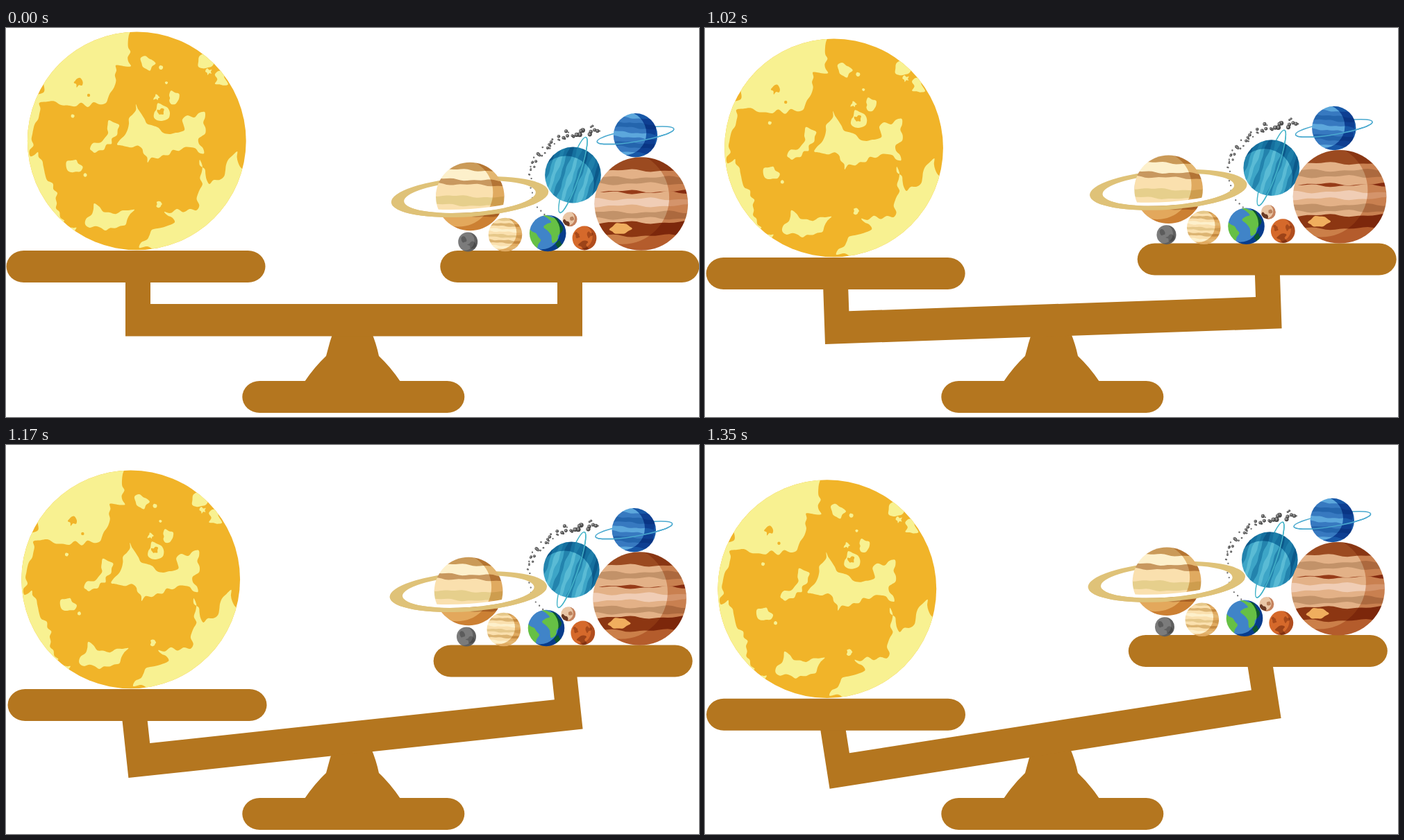
An HTML page for the animation above (2.7 s loop, 998 by 561 pixels).

```html
<!DOCTYPE html>
<html lang="en">
<head>
<meta charset="utf-8">
<title>Sun and planets on a balance</title>
<style>
  html, body { margin: 0; width: 100%; height: 100%; overflow: hidden; background: #fff; }
  svg { display: block; width: 100vw; height: 100vh; }
  .shade { mix-blend-mode: multiply; }
</style>
</head>
<body>
<svg id="stage" viewBox="0 0 998 561"></svg>
<script>
const WOOD = '#b4761f', PALE = '#f8f191', ORANGE = '#f1b429';
let clipCount = 0, seed = 20264;
const random = () => (seed = seed * 16807 % 2147483647) / 2147483647;
const jitter = amount => (random() * 2 - 1) * amount;

// Closed Catmull-Rom curve through the points.
function smooth(fill, p) {
  const at = i => p[(i + p.length) % p.length];
  let d = 'M' + p[0];
  p.forEach((a, i) => {
    const before = at(i - 1), b = at(i + 1), after = at(i + 2);
    const c1 = a.map((v, k) => v + (b[k] - before[k]) / 6);
    const c2 = b.map((v, k) => v - (after[k] - a[k]) / 6);
    d += `C${c1} ${c2} ${b}`;
  });
  return `<path fill="${fill}" d="${d}Z"/>`;
}

// Ragged patch: key corners "x y, x y", each edge broken into wobbling pieces.
function patch(fill, corners, wobble = .1) {
  const keys = corners.split(',').map(c => c.trim().split(' ').map(Number)), points = [];
  keys.forEach(([x, y], i) => {
    const [nx, ny] = keys[(i + 1) % keys.length], dx = nx - x, dy = ny - y;
    const pieces = 1 + Math.min(4, Math.floor(Math.hypot(dx, dy) / 9));
    for (let k = 0; k < pieces; k++) {
      const f = k / pieces, off = k ? jitter(wobble) : 0;
      points.push([x + dx * f - dy * off, y + dy * f + dx * off]);
    }
  });
  return smooth(fill, points);
}

function island(fill, x, y, r) {
  const wobble = r < 4 ? .1 : .45;
  return smooth(fill, Array.from({ length: 10 }, (_, i) => {
    const a = i * Math.PI / 5, d = r * (1 + jitter(wobble));
    return [x + d * Math.cos(a), y + d * Math.sin(a)];
  }));
}

const circle = (x, y, r, fill) => `<circle cx="${x}" cy="${y}" r="${r}" fill="${fill}"/>`;
const group = (transform, body) => `<g transform="${transform}">${body}</g>`;
const oval = (rx, ry) => `M${-rx} 0a${rx} ${ry} 0 1 0 ${2 * rx} 0a${rx} ${ry} 0 1 0 ${-2 * rx} 0Z`;
const pill = (x, y, w, id = '') =>
  `<rect id="${id}" x="${x}" y="${y}" width="${w}" height="46" rx="25" ry="23" fill="${WOOD}"/>`;

function clipped(shape, body) {
  const id = 'clip' + clipCount++;
  return `<clipPath id="${id}">${shape}</clipPath><g clip-path="url(#${id})">${body}</g>`;
}

// Everything below a wavy line, so later layers cover earlier ones.
function layer(r, top, fill, phase) {
  let d = `M${-r} ${r + 5}`;
  for (let x = -r; x <= r; x += r / 10) {
    const wave = Math.sin(x / r * 5 + phase) + .6 * Math.sin(x / r * 11 + phase * 2);
    d += `L${x} ${top + r * .022 * wave}`;
  }
  return `<path fill="${fill}" d="${d}V${r + 5}Z"/>`;
}

const stripes = (r, count, colors) => Array.from({ length: count },
  (_, i) => [-r + 2 * r * i / count, colors[i % colors.length]]);

// Striped planet, shaded outside a circle offset by dx, dy.
function planet({ x, y, r, fill, layers = [], tilt = 0, detail = '', shade, dx = -r * .33, dy = -r * .12 }) {
  const bands = layers.map(([top, color], i) => layer(r, top, color, i * 2.1)).join('');
  const dark = `<path class="shade" fill="${shade}" fill-rule="evenodd"
    d="M${-2 * r} ${-2 * r}h${4 * r}v${4 * r}h${-4 * r}Z
    M${dx - r} ${dy}a${r} ${r} 0 1 0 ${2 * r} 0a${r} ${r} 0 1 0 ${-2 * r} 0Z"/>`;
  return group(`translate(${x} ${y})`, clipped(circle(0, 0, r, '#000'),
    circle(0, 0, r + 1, fill) + group(`rotate(${tilt})`, bands) + detail + dark));
}

// Thin ring that passes behind the planet and returns in front of it.
function ringed(rx, ry, tilt, color, options) {
  const line = d => group(`translate(${options.x} ${options.y}) rotate(${tilt})`,
    `<path fill="none" stroke="${color}" stroke-width="1.5" d="${d}"/>`);
  return line(oval(rx, ry)) + planet(options) + line(`M${-rx} 0A${rx} ${ry} 0 0 0 ${rx} 0`);
}

// Rocks scattered along a quadratic curve, shrinking toward its end.
function rocks(count, [x0, y0], [x1, y1], [x2, y2], spread, size) {
  let out = '';
  for (let i = 0; i < count; i++) {
    const t = i / (count - 1), u = 1 - t;
    const x = u * u * x0 + 2 * u * t * x1 + t * t * x2 + jitter(spread * (.3 + u));
    const y = u * u * y0 + 2 * u * t * y1 + t * t * y2 + jitter(spread * (.3 + u));
    const r = 1 + size * (.25 + u * .75) * random();
    out += circle(x, y, r, '#484848') + circle(x - r * .2, y - r * .2, r * .6, '#929292');
  }
  return out;
}

const sunPatches = [
  `177 -5, 176 28, 180 55, 158 54, 157 82, 144 108, 100 113, 48 108, 48 124, 38 153, 35 185, 46 179,
   55 205, 74 238, 72 260, 84 278, 66 285, 20 240, 25 150, 38 112, 72 57, 95 0`,
  `187 110, 203 138, 235 153, 257 147, 254 132, 286 121, 287 152, 277 160, 285 181, 266 172, 240 176,
   204 194, 196 174, 160 168, 177 138`,
  '121 174, 147 152, 148 133, 163 140, 152 167, 128 180',
  `333 178, 345 215, 310 290, 250 325, 192 317, 210 291, 243 280, 228 265, 274 263, 283 225, 279 190,
   293 225, 314 214, 320 190`,
  '127 253, 140 265, 185 262, 172 284, 143 292, 114 283'
].map(corners => patch(PALE, corners)).join('');

const sunIslands = [[204, 51, 9], [241, 101, 8], [223, 122, 12], [287, 48, 9], [310, 74, 9], [98, 200, 10],
  [96, 292, 6], [292, 63, 4], [221, 254, 4], [217, 100, 4], [223, 57, 3], [96, 127, 2.5], [231, 79, 2], [114, 212, 2.6]]
  .map(spot => island(PALE, ...spot)).join('');

const sun = clipped(circle(188.3, 162.9, 157.4, '#000'), circle(188.3, 163, 159, ORANGE) + sunPatches + sunIslands +
  island(ORANGE, 104, 79, 6) + island(ORANGE, 222, 121, 5) + circle(119, 97, 2.2, ORANGE));

const saturnRing = `<path fill="#dfc278" fill-rule="evenodd" d="${oval(113.5, 28.5)}${oval(95, 22.5)}"/>`;
const ringFrame = 'translate(668 243.5) rotate(-4)';
const saturn = group(ringFrame, saturnRing) +
  planet({ x: 668.3, y: 243, r: 49.3, fill: '#ca9a58', tilt: 2, shade: '#e5c28d',
    layers: [[-38, '#fdf0cb'], [-24, '#c8985f'], [-17, '#fae0ae'], [0, '#e6cf8c'], [13, '#fae0ae'],
      [23, '#bb7e40'], [28, '#e3a85c']] }) +
  group(ringFrame, clipped('<rect x="-120" y="4" width="240" height="40"/>',
    clipped('<rect x="-49" y="0" width="98" height="40"/>',
      `<path fill="none" stroke="#fff" stroke-width="5" d="${oval(95, 20)}"/>`) + saturnRing));

const VENUS = ['#e6c88a', '#fae0ae', '#dcb472', '#fae0ae', '#fdf0cb', '#fae0ae'];
const URANUS = ['#2383ad', '#3da5c7', '#5abbd5', '#3da5c7'];
const NEPTUNE = ['#5ca7dc', '#3779c0', '#2465ad', '#3779c0'];

const planets = rocks(46, [856, 149], [775, 148], [752, 212], 8, 3) +
  rocks(9, [755, 216], [753, 248], [775, 269], 1.5, .4) + saturn +
  planet({ x: 665.2, y: 308.5, r: 14, fill: '#7b7b7b', shade: '#c4c4c4',
    detail: island('#5c5c5c', -6, -3, 4) + island('#606060', 5, 4, 5) }) +
  planet({ x: 719, y: 298, r: 24.3, fill: '#fae0ae', tilt: 3, shade: '#e5c28d', layers: stripes(24.3, 12, VENUS) }) +
  planet({ x: 780.2, y: 296, r: 26.3, fill: '#4084c8', shade: '#1a73b2',
    detail: patch('#66c045', '-7 -26, 13 -22, 22 -8, 14 10, 7 14, 5 3, -6 -9, 5 -16') +
      patch('#66c045', '-27 -6, -17 0, -10 10, -16 22, -27 10') + island('#66c045', 16, 16, 4) }) +
  planet({ x: 812, y: 275.8, r: 10.5, fill: '#e9c6a5', shade: '#d8a890',
    detail: island('#6b3a24', -6, 6, 4.5) + island('#b9815c', 3, -1, 3) }) +
  planet({ x: 833, y: 303, r: 17.4, fill: '#d5692b', shade: '#d3bbb2',
    detail: island('#9c4318', -1, 10, 6) + island('#a84a1b', -10, -4, 4) + island('#a84a1b', 8, -5, 4) }) +
  ringed(57.5, 9, -71, '#45b4c9', { x: 816.5, y: 212, r: 40.4, fill: URANUS[0], tilt: -71,
    shade: '#54adcc', dx: -10, dy: 13, layers: stripes(40.4, 14, URANUS) }) +
  ringed(56, 9, -9.5, '#4aa9cf', { x: 906.5, y: 154.8, r: 31.7, fill: NEPTUNE[0], tilt: 5,
    shade: '#4085c2', dx: -16, dy: -3, layers: stripes(31.7, 9, NEPTUNE) }) +
  planet({ x: 914.8, y: 253.5, r: 67.3, fill: '#9b4a20', shade: '#e2b897', dx: -27, dy: -9,
    layers: [[-48, '#e3b187'], [-38, '#c29269'], [-29, '#e3b187'], [-18, '#963b18'], [-16, '#e3b187'],
      [-7, '#f0cdb5'], [3, '#e3b187'], [12, '#c29269'], [21, '#e3b187'], [27, '#8c3612'], [46, '#cb7f49']],
    detail: patch('#f0ae5e', '-46 37, -36 28, -22 29, -13 36, -24 43, -38 43', .03) });

const stage = document.getElementById('stage');
stage.innerHTML = `
  <path fill="${WOOD}" d="M474 430Q466 452 461 473Q444 489 430 510H568Q554 489 537 473Q533 454 526 438V430Z"/>
  ${pill(340.3, 509, 320)}
  <path id="beam" fill="${WOOD}" d="M172 350H208V398H794V350H830V444.5H172Z"/>
  ${pill(.5, 321, 373, 'leftPan')}${pill(625.3, 321, 373, 'rightPan')}
  <g id="sun">${sun}</g><g id="planets">${planets}</g>`;

const part = Object.fromEntries(['beam', 'leftPan', 'rightPan', 'sun', 'planets']
  .map(id => [id, document.getElementById(id)]));
const move = (name, x, y) => part[name].setAttribute('transform', `translate(${x} ${y})`);

function draw(now) {
  // Sixteen 30 ms steps, eased by a half cosine, then a hard return.
  const step = Math.max(0, Math.min(16, Math.floor((now % 2700 - 900) / 30) + 1));
  const e = (1 - Math.cos(Math.PI * step / 16)) / 2;
  part.beam.setAttribute('transform', `rotate(${-8.9 * e} 505 421.5)`);
  move('leftPan', 6.1 * e - 4.6 * e * e, 44.7 * e);
  move('rightPan', -10.5 * e - 5 * e * e, -47 * e);
  move('sun', -12.5 * e, 44.7 * e);
  move('planets', -3.2 * e, -46.3 * e);
}

const start = performance.now();
function tick() {
  draw(performance.now() - start);
  requestAnimationFrame(tick);
}
tick();
</script>
</body>
</html>
```
